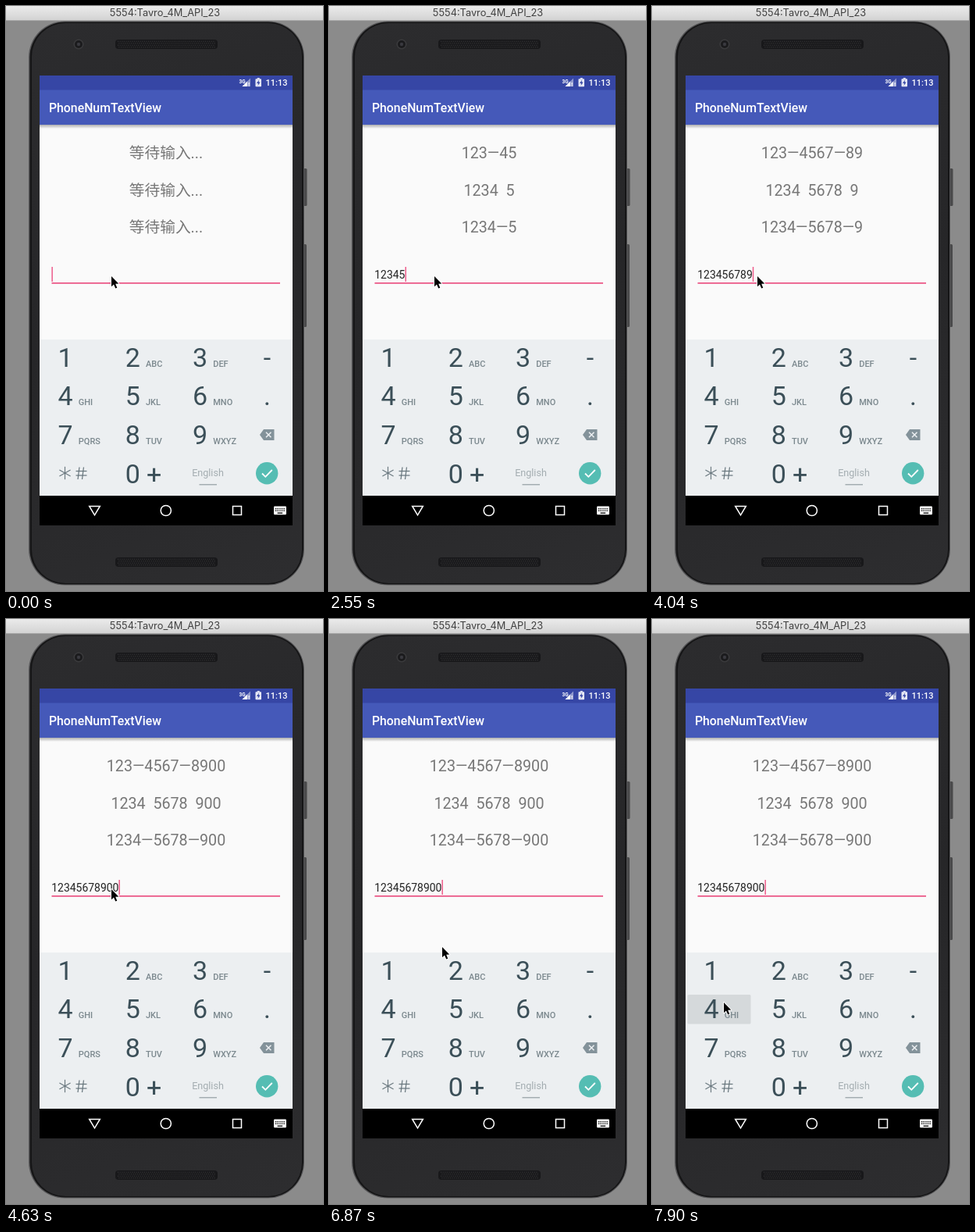
An HTML page with a canvas for the animation above (8000 ms loop, 406 px wide and 749 px high).

```html
<!DOCTYPE html>
<html lang="en">
<head>
<meta charset="utf-8">
<title>Phone number field</title>
<style>
html, body { margin: 0; width: 100%; height: 100%; overflow: hidden; background: #8b8b8b; }
canvas { display: block; }
</style>
</head>
<body>
<canvas id="stage" width="406" height="749"></canvas>
<script>
const ctx = document.getElementById('stage').getContext('2d');
const LOOP = 8000;
const NUMBER = '12345678900';
const ROBOTO = 'Roboto, "Noto Sans CJK SC", "Noto Sans CJK", sans-serif';

const TYPED_AT = [1200, 1500, 1950, 2250, 2550, 2850, 3150, 3440, 4040, 4330, 4630];
const CARET_TOGGLES = [150, 750, 5080, 5530, 6280, 6580, 7030, 7460];
const POINTER = [
  [0, 135, 346], [6580, 138, 374], [6730, 145, 420], [6880, 152, 468], [7030, 155, 481],
  [7170, 157, 470], [7320, 157, 454], [7460, 157, 450], [7610, 80, 455], [7760, 81, 457], [7900, 92, 491]
];
const PRESSES = [
  [7460, 7610, 132, 431], [7760, 7900, 46, 431], [7900, LOOP, 45.5, 481]
];

function rect(x, y, w, h, fill) {
  ctx.fillStyle = fill;
  ctx.fillRect(x, y, w, h);
}

function round(x, y, w, h, r, fill) {
  ctx.beginPath();
  ctx.roundRect(x, y, w, h, r);
  ctx.fillStyle = fill;
  ctx.fill();
}

function disc(x, y, r, fill) {
  ctx.beginPath();
  ctx.arc(x, y, r, 0, Math.PI * 2);
  ctx.fillStyle = fill;
  ctx.fill();
}

function path(points, close) {
  ctx.beginPath();
  points.forEach(([x, y]) => ctx.lineTo(x, y));
  if (close) ctx.closePath();
}

function stroke(points, color, width, close) {
  path(points, close);
  ctx.strokeStyle = color;
  ctx.lineWidth = width;
  ctx.stroke();
}

function text(str, x, y, size, color, weight = 400, align = 'left', family = ROBOTO) {
  ctx.font = `${weight} ${size}px ${family}`;
  ctx.textAlign = align;
  ctx.fillStyle = color;
  ctx.fillText(str, x, y);
}

function gradient(x0, y0, x1, y1, ...colors) {
  const g = ctx.createLinearGradient(x0, y0, x1, y1);
  colors.forEach((c, i) => g.addColorStop(i / (colors.length - 1), c));
  return g;
}

function grille(y) {
  round(140, y, 131, 12, 4, '#18181a');
  ctx.save();
  ctx.setLineDash([1.2, 1.4]);
  for (let row = 0; row < 4; row++) {
    const ry = y + 2.3 + row * 2.5;
    stroke([[143 + row % 2 * 1.3, ry], [268, ry]], '#3a3a3c', 1.1);
  }
  ctx.restore();
}

function drawPhone() {
  rect(0, 0, 406, 749, '#8b8b8b');
  rect(0, 0, 406, 18, gradient(0, 0, 0, 18, '#ebebeb', '#d3d3d3'));
  rect(0, 18, 406, 1, '#aaaaaa');
  text('5554:Tavro_4M_API_23', 203.5, 13, 12.8, '#414141', 400, 'center', 'Inter, sans-serif');

  round(380, 208, 5.5, 48, 1.5, '#4a4a4b');
  round(380, 305, 5, 106, 1.5, '#4a4a4b');
  round(29, 19.5, 353, 722, 46, '#555557');
  round(30.5, 20.5, 350.5, 720, 45, '#151516');
  round(33, 22, 346, 717, 43, gradient(60, 20, 340, 740, '#2c2c2e', '#262628', '#2d2d2f'));

  grille(43);
  grille(706);
  disc(93, 49, 6.5, '#3b3b3d');
  disc(93, 49, 5, '#1b1b1d');
  disc(93, 49, 2.2, '#39393f');
}

function drawStatusBar() {
  rect(43, 89, 324, 18.5, '#3646a5');
  text('3G', 298.5, 99, 6.5, '#fff', 700);
  path([[313, 92.5], [313, 103], [302.5, 103]], true);
  ctx.fillStyle = 'rgba(255,255,255,.45)';
  ctx.fill();
  path([[309, 96.5], [309, 103], [302.5, 103]], true);
  ctx.fillStyle = '#fff';
  ctx.fill();
  text('!', 310, 103, 8, '#fff', 700);
  round(319.5, 93.3, 7.5, 10, 0.8, '#e6e8f5');
  rect(321.8, 92, 3, 1.5, '#e6e8f5');
  path([[324, 94.5], [321, 99], [323, 99], [322.6, 102], [325.6, 97.6], [323.6, 97.6]], true);
  ctx.fillStyle = '#3646a5';
  ctx.fill();
  text('11:13', 332.5, 102, 11, '#fff', 500);
}

function drawAppBar() {
  rect(43, 107, 324, 320, '#fafafa');
  rect(43, 107, 324, 45, '#4559b9');
  rect(43, 152, 324, 5, gradient(0, 152, 0, 157, 'rgba(0,0,0,.3)', 'rgba(0,0,0,0)'));
  text('PhoneNumTextView', 55, 136, 15.8, '#fff', 500);
}

function drawKeys() {
  const dark = '#3b4f58', soft = '#7b888e';
  const letters = ['', 'ABC', 'DEF', 'GHI', 'JKL', 'MNO', 'PQRS', 'TUV', 'WXYZ'];
  letters.forEach((label, i) => {
    const x = 66.5 + i % 3 * 86.2, y = 462 + Math.floor(i / 3) * 49.4;
    text(String(i + 1), x, y, 34, dark);
    text(label, x + 26.3, y, 11, soft, 500);
  });
  text('-', 334.5, 462, 34, dark, 400, 'center');
  text('.', 334.5, 511, 34, dark, 400, 'center');
  text('0', 152.7, 610.5, 34, dark);
  text('+', 180, 610.5, 34, dark);

  for (let a = 0; a < 3; a++) {
    const dx = 8.2 * Math.sin(a * Math.PI / 3), dy = 8.2 * Math.cos(a * Math.PI / 3);
    stroke([[75.5 - dx, 598 - dy], [75.5 + dx, 598 + dy]], '#6d7b82', 1.2);
  }
  for (const s of [0, 1]) {
    stroke([[94 + s * 5.5, 590.5], [92 + s * 5.5, 606]], '#66757c', 1.2);
    stroke([[89.5, 595.5 + s * 5.5], [103.5, 595.5 + s * 5.5]], '#66757c', 1.2);
  }

  text('English', 258.5, 602, 12.6, '#a4adb1', 400, 'center');
  rect(247.5, 612, 22.5, 1.5, '#a4adb1');

  path([[325, 549], [330, 542], [343.5, 542], [343.5, 556], [330, 556]], true);
  ctx.fillStyle = '#83929a';
  ctx.fill();
  stroke([[333, 545.7], [339.5, 552.3]], '#eceff1', 1.5);
  stroke([[339.5, 545.7], [333, 552.3]], '#eceff1', 1.5);

  disc(334.2, 598.3, 14.2, '#55bdb3');
  stroke([[328, 598.5], [332.3, 602.8], [340.8, 594]], '#fff', 1.8);
}

function drawNavBar() {
  rect(43, 627, 324, 38, '#000');
  stroke([[106.7, 640.5], [120.3, 640.5], [113.5, 651.8]], '#fff', 1.5, true);
  ctx.beginPath();
  ctx.arc(204.8, 646, 6.6, 0, Math.PI * 2);
  ctx.stroke();
  ctx.strokeRect(290.5, 640.5, 11, 11);
  round(343, 640.5, 16, 10.8, 1.2, '#fff');
  for (let i = 0; i < 5; i++) {
    rect(345 + i * 2.6, 643, 1.4, 1.4, '#000');
    rect(345 + i * 2.6, 645.5, 1.4, 1.4, '#000');
  }
  rect(347.6, 648.5, 6.6, 1.3, '#000');
}

// A separator follows each group as soon as it is full.
function grouped(digits, first, second, separator) {
  let out = '';
  for (let i = 0; i < digits.length; i++) {
    out += digits[i];
    if (i + 1 === first || i + 1 === first + second) out += separator;
  }
  return out;
}

function drawFields(t) {
  const digits = NUMBER.slice(0, TYPED_AT.filter(at => t >= at).length);
  const labels = [[3, 4, '—'], [4, 4, '  '], [4, 4, '—']];
  labels.forEach((format, i) => {
    const label = digits ? grouped(digits, ...format) : '等待输入...';
    text(label, 205, 195.4 + i * 47.4, 19.7, '#777', 400, 'center');
  });

  rect(58.5, 354, 292.5, 1.6, '#e9487c');
  text(digits, 58.3, 349, 13.93, '#222');
  const caretOn = CARET_TOGGLES.filter(at => t >= at).length % 2 === 0;
  if (caretOn) rect(58.4 + digits.length * 7.82, 334, 1.5, 19, '#ee5c8b');
}

function drawPointer(t) {
  const [, x, y] = POINTER.filter(p => t >= p[0]).pop();
  ctx.save();
  ctx.translate(x, y);
  ctx.lineJoin = 'round';
  stroke([[0, 0], [0, 13.2], [3, 10.5], [5.2, 15.6], [7.3, 14.7], [5.2, 9.8], [9.3, 9.6]], '#fff', 2, true);
  ctx.fillStyle = '#000';
  ctx.fill();
  ctx.restore();
}

function draw() {
  const t = performance.now() % LOOP;
  drawPhone();
  drawAppBar();
  drawStatusBar();
  drawFields(t);
  rect(43, 427, 324, 200, '#eceff1');
  for (const [from, to, x, y] of PRESSES) {
    if (t >= from && t < to) round(x, y, 81, 37.5, 1.5, '#d5d9db');
  }
  drawKeys();
  drawNavBar();
  drawPointer(t);
  requestAnimationFrame(draw);
}

requestAnimationFrame(draw);
</script>
</body>
</html>
```
